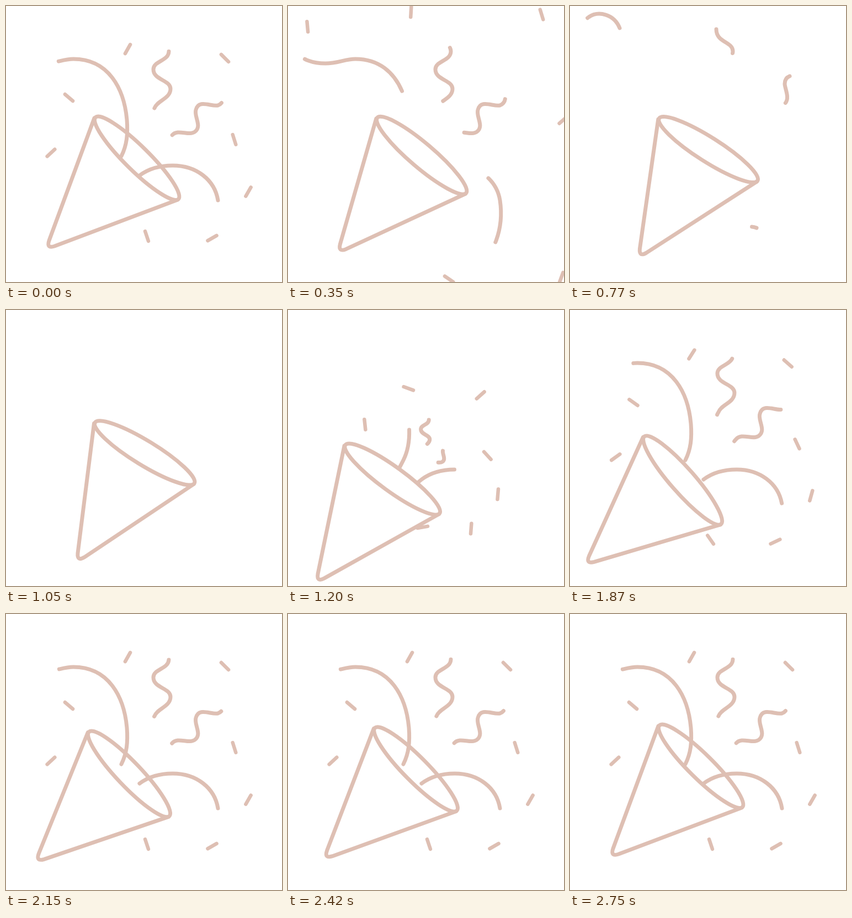
Recreate the animation shown at these times as an HTML page. Size 500 by 500 pixels, loop 2770 ms.

```html
<!DOCTYPE html>
<html lang="en">
<head>
<meta charset="utf-8">
<title>Party popper</title>
<style>
  html, body { margin: 0; width: 100%; height: 100%; overflow: hidden; background: #fff; }
  svg { display: block; width: 100%; height: 100%; }
</style>
</head>
<body>
<svg viewBox="0 0 500 500" fill="none" stroke="#debfb3" stroke-width="7" stroke-linecap="round" stroke-linejoin="round">
  <g id="dashes" stroke-width="6.5"></g>
  <g id="ribbons"></g>
  <g id="cone">
    <path d="M160 203L78 425Q73 440 88 435L311 351A105.500 22 44.6 0 1 160 203" fill="#fff" stroke="none"/>
    <ellipse id="mouth" cx="237.2" cy="275.8" rx="105.5" ry="22" transform="rotate(44.6 237.2 275.8)"/>
    <path d="M160 203L78 425Q73 440 88 435L311 351"/>
  </g>
</svg>
<script>
const LOOP = 2770, BURST = 1080, SETTLED = 2260;
const ORIGIN = [212, 326];
const $ = id => document.getElementById(id);
const clamp = u => Math.min(1, Math.max(0, u));
const mix = (a, b, u) => a + (b - a) * u;
const smooth = (t, from, to) => {
  const u = clamp((t - from) / (to - from));
  return u * u * (3 - 2 * u);
};
const easeIn = (t, end, power) => clamp(t / end) ** power;
const easeOut = (t, power) => 1 - (1 - clamp((t - BURST) / (SETTLED - BURST))) ** power;

function add(parent, tag) {
  return parent.appendChild(document.createElementNS('http://www.w3.org/2000/svg', tag));
}

// Monotone cubic interpolation through [time, value] keys.
function track(...keys) {
  const slopes = keys.slice(1).map(([t, v], i) => (v - keys[i][1]) / (t - keys[i][0]));
  const tangents = keys.map((_, i) => {
    const a = slopes[i - 1] || 0, b = slopes[i] || 0;
    return a * b > 0 ? 2 * a * b / (a + b) : 0;
  });
  return t => {
    const last = keys.length - 1;
    if (t <= keys[0][0]) return keys[0][1];
    if (t >= keys[last][0]) return keys[last][1];
    const i = keys.findIndex(k => k[0] > t) - 1;
    const [t0, v0] = keys[i], [t1, v1] = keys[i + 1];
    const h = t1 - t0, u = (t - t0) / h, w = 1 - u;
    return v0 * w * w * (1 + 2 * u) + v1 * u * u * (3 - 2 * u)
      + h * u * w * (w * tangents[i] - u * tangents[i + 1]);
  };
}

// The cone tilts back, kicks down on the burst, swings over and settles.
const unsettled = track([1570, 1], [2150, 0.29], [LOOP, 0]);
function drawCone(t) {
  const swing = smooth(t, 1030, 1570);
  const kick = smooth(t, 1045, 1195) * unsettled(t);
  const turn = mix(-13.2 * smooth(t, 0, 930), 6.2, swing) * unsettled(t);
  const x = -kick * mix(63, 41, swing), y = kick * 41.5;
  $('cone').setAttribute('transform', `translate(${x} ${y}) rotate(${turn} 170 205)`);
  // Ribbons emerge from behind the mouth, later they lie over it.
  $('mouth').setAttribute('fill', t > BURST && t < 1400 ? '#fff' : 'none');
}

// Dashes fly out of ORIGIN, spinning, and later fly on along the same ray.
const dashReach = track([BURST, 0.05], [1200, 0.74], [1570, 0.958], [2120, 1]);
function dash(x, y, angle, spin, speed) {
  const el = add($('dashes'), 'path');
  el.setAttribute('d', 'M-9.300 0H9.300');
  return t => {
    const leaving = t < BURST;
    const far = leaving ? speed * smooth(t, 0, 640) / smooth(350, 0, 640) : dashReach(t) - 1;
    const turn = angle + spin * far * (leaving ? 2 / speed : 24);
    const px = x + (x - ORIGIN[0]) * far, py = y + (y - ORIGIN[1]) * far;
    el.setAttribute('transform', `translate(${px} ${py}) rotate(${turn})`);
    el.style.display = leaving && t > 700 ? 'none' : '';
  };
}

// A ribbon shows the part of a curve between tail and head, scaled about ORIGIN.
// While leaving, both ends run to the end of the curve.
function ribbon({ d, from, to, power, gone, arrive }) {
  const el = add($('ribbons'), 'path');
  el.setAttribute('d', d);
  const total = el.getTotalLength();
  const nearest = ([x, y]) => {
    let best = 0, min = Infinity;
    for (let s = 0; s <= total; s += 0.5) {
      const p = el.getPointAtLength(s), dist = Math.hypot(p.x - x, p.y - y);
      if (dist < min) { min = dist; best = s; }
    }
    return best;
  };
  const start = nearest(from), end = nearest(to);
  const scaled = k => {
    let i = 0;
    return d.replace(/[\d.]+/g, n => {
      const o = ORIGIN[i++ % 2];
      return mix(o, +n, k).toFixed(2);
    });
  };
  return t => {
    let tail, head, scale = 1;
    if (t < BURST) {
      tail = mix(start, total, easeIn(t, gone, power));
      head = mix(end, total, easeIn(t, 770, power));
    } else {
      [tail, head, scale] = arrive(t, start, end);
    }
    tail = Math.max(0, tail * scale);
    const shown = head * scale - tail;
    el.setAttribute('d', scaled(scale));
    el.setAttribute('stroke-dasharray', `${Math.max(0, shown)} 9999`);
    el.setAttribute('stroke-dashoffset', -tail);
    el.style.display = shown > 0.3 ? '' : 'none';
  };
}

// Streamers grow out of the mouth.
const grow = power => (t, start, end) =>
  [start * smooth(t, 1200, 1560), mix(start, end, easeOut(t, power)), 1];

// Squiggles swell from the mouth while their ends slide along the curve.
function swell(early, late) {
  const tail = track([1200, 0.2], [1570, -0.06], [SETTLED, 0]);
  const head = track([1200, early], [1570, late], [SETTLED, 1]);
  return (t, start, end) =>
    [mix(start, end, tail(t)), mix(start, end, head(t)), easeOut(t, 6.8)];
}

const parts = [
  drawCone,
  dash(220.5, 78, -60.6, -13, 0.27),
  dash(396.5, 94.5, 45, 14, 0.34),
  dash(114, 166, 40.6, 22, 0.8),
  dash(81.5, 266, -42.7, -30, 0.9),
  dash(413.5, 242, 72.6, 33, 0.42),
  dash(439, 336.5, 120, 62, 0.5),
  dash(373.5, 420.5, -30, -20, 0.75),
  dash(255, 417, 71.6, 71, 0.85),
  ribbon({
    d: 'M192 302C199 292 204 282 209 272C219 252 221 232 219 206C214 150 186 96 122 96' +
      'C103 96 90 104 68 104C55 104 45 102 37 99C22 94 13.5 82 13.5 62C13.5 42 20 30 34 20C52 8 80 15 90 40',
    from: [209, 272], to: [95, 99], power: 1.55, gone: 855, arrive: grow(2.3)
  }),
  ribbon({
    d: 'M228 320Q235 312 242 307C258 295 280 289 302 289C345 289 378 315 384 352' +
      'C387 372 387 398 377 425C367 450 352 467 333 467C315 467 306 448 306 432C306 415 318 393 338 402',
    from: [242, 307], to: [384, 352], power: 1.45, gone: 783, arrive: grow(4.1)
  }),
  ribbon({
    d: 'M266 194C266 190 267 188 269 185C274 171 298 168 298 150C298 134 267 134 267 115' +
      'C267 99 295 100 295 82C295 64 265 67 265 42',
    from: [269, 185], to: [295, 83], power: 2.6, gone: 880, arrive: swell(1, 0.93)
  }),
  ribbon({
    d: 'M295 246C295 241 297 238 301 234C311 222 331 236 342 228C356 218 340 200 344 188' +
      'C349 168 372 183 384 180C402 173 389 150 389 141C389 133 393 129 398 127',
    from: [301, 234], to: [390, 176], power: 2.5, gone: 880, arrive: swell(0.6, 0.82)
  })
];

const began = performance.now();
function tick() {
  const t = (performance.now() - began) % LOOP;
  parts.forEach(draw => draw(t));
  requestAnimationFrame(tick);
}
tick();
</script>
</body>
</html>
```
